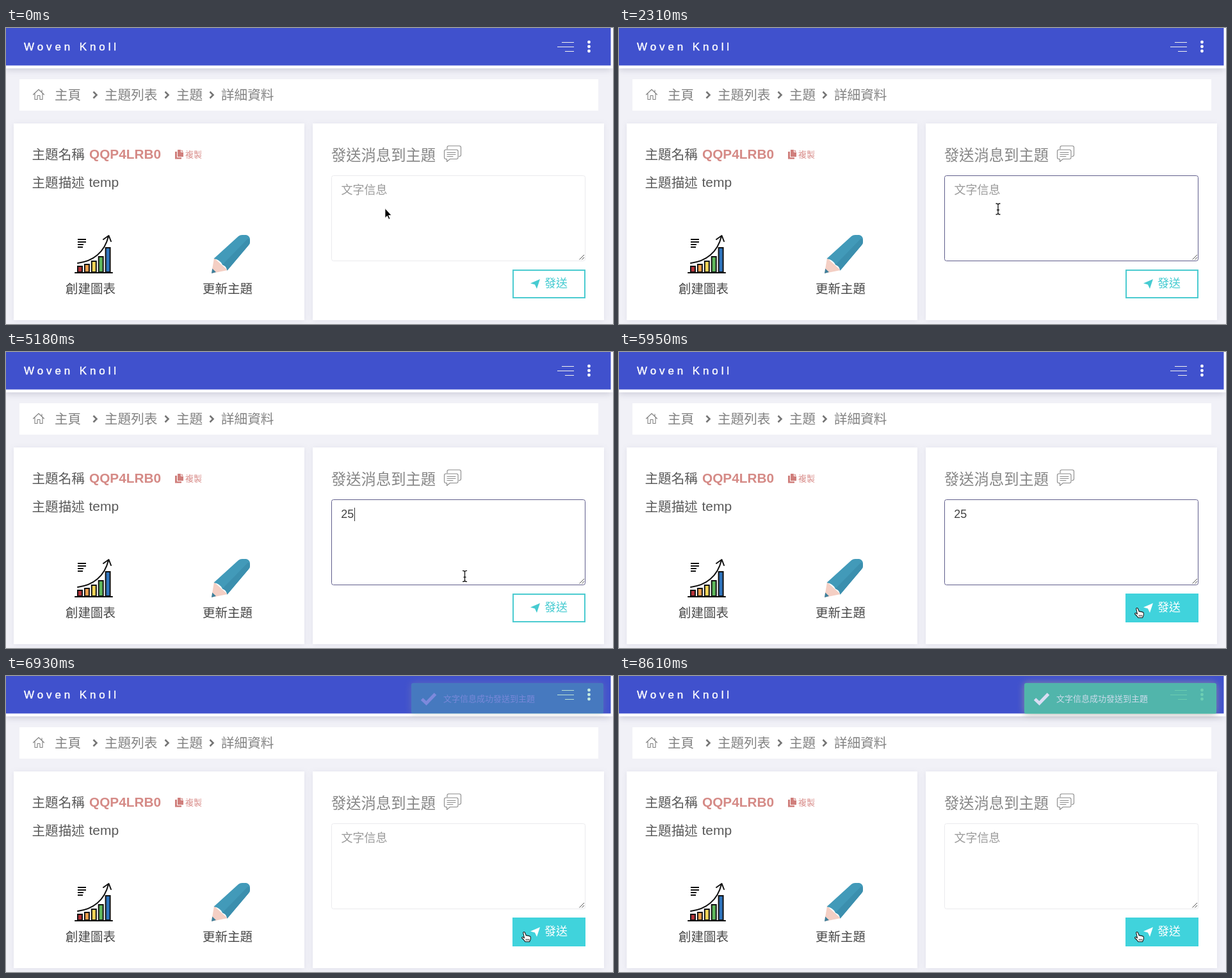
An HTML page that plays this animation: 948 by 462 pixels, repeating every 8820 ms.

```html
<!DOCTYPE html>
<html lang="zh-Hant">
<head>
<meta charset="utf-8">
<title>Topic details</title>
<style>
  html, body { margin: 0; width: 100%; height: 100%; overflow: hidden; background: #f1f1f7; }
  svg { display: block; width: 948px; height: 462px; }
  text { font-family: "Liberation Sans", "Noto Sans CJK TC", "Noto Sans CJK SC", "Noto Sans CJK JP", "Noto Sans CJK", sans-serif; }
  .cjk { font-family: "Noto Sans CJK TC", "Noto Sans CJK SC", "Noto Sans CJK JP", "Noto Sans CJK", sans-serif; font-weight: 300; }
  .crumb { font-size: 20.6px; fill: #828282; }
  .info { font-size: 20.6px; fill: #5a5a5a; }
  .label { font-size: 19.5px; fill: #484848; }
  .line { fill: none; stroke-linecap: round; stroke-linejoin: round; }
  .card { filter: drop-shadow(0 1px 4px rgba(80, 80, 130, .1)); }
  .head { filter: drop-shadow(0 3px 5px rgba(70, 70, 110, .2)); }
  .toast { filter: drop-shadow(0 0 6px #999); }
</style>
</head>
<body>
<svg viewBox="0 0 948 462">
  <rect width="948" height="462" fill="#f1f1f7"/>

  <!-- header -->
  <rect class="head" width="945" height="63" fill="#fff"/>
  <rect x="944" width="4" height="63" fill="#fafafd"/>
  <rect width="944.5" height="58.5" fill="#4051cd"/>
  <text x="28" y="34.500" font-size="17" letter-spacing="4.9" fill="#fff" stroke="#fff" stroke-width=".4">Woven Knoll</text>
  <path d="M868 22.500H887M861 29.500H887M873 36.500H887" stroke="#f4f4ee" stroke-width="1"/>
  <g fill="#fff"><circle cx="910.500" cy="22" r="2.400"/><circle cx="910.500" cy="29" r="2.400"/><circle cx="910.500" cy="36" r="2.400"/></g>

  <!-- breadcrumb -->
  <rect x="21" y="80" width="904" height="49" fill="#fff"/>
  <path class="line" d="M42.500 104 51 96 59.500 104M45 102.500V111.500H49V105.500H53V111.500H57V102.500M56 97V100" stroke="#808080" stroke-width="1.100"/>
  <g class="crumb">
    <text class="cjk" x="76" y="111.500">主頁</text>
    <text class="cjk" x="154" y="111.500">主題列表</text>
    <text class="cjk" x="266" y="111.500">主題</text>
    <text class="cjk" x="336" y="111.500">詳細資料</text>
  </g>
  <path d="M136.500 99.500 141.500 104.500 136.500 109.500M248.500 99.500 253.500 104.500 248.500 109.500M318.500 99.500 323.500 104.500 318.500 109.500" fill="none" stroke="#757575" stroke-width="2.600"/>

  <!-- cards -->
  <rect class="card" x="12" y="149" width="454" height="307" fill="#fff"/>
  <rect class="card" x="479" y="149" width="455" height="307" fill="#fff"/>

  <!-- topic info -->
  <text class="cjk info" x="40.500" y="204.500">主題名稱</text>
  <text x="130" y="204" font-size="20.8" font-weight="700" fill="#d58a86">QQP4LRB0</text>
  <path d="M268 190H273V194H277V201H268Z M274 190 277 193H274Z M264 193H267V202H274V204.500H264Z" fill="#d07f7c"/>
  <text class="cjk" x="280" y="202" font-size="13" fill="#d98e8b">複製</text>
  <text class="cjk info" x="40.500" y="248.500">主題描述</text>
  <text class="info" x="129.500" y="248" style="font-size:21px">temp</text>

  <!-- chart icon -->
  <g class="line" stroke="#111" stroke-width="2">
    <path d="M108 382H166" stroke-width="2.200"/>
    <g id="bars" stroke-linejoin="miter"></g>
    <path d="M112 367C136 364 154 350 160 325M152 330 160.500 324 164 333"/>
    <path d="M112 330H125M112 334H125M112 338H121M112 342H120" stroke-linecap="butt"/>
  </g>
  <text class="cjk label" x="93" y="414">創建圖表</text>

  <!-- pencil icon -->
  <path d="M321 383 325 359 346 378Z" fill="#f4cfc4"/>
  <path d="M321 383 322.200 375.500 328 381Z" fill="#3d7f9b"/>
  <path d="M324.500 360 363 325Q366 322.500 370 323H375Q380 324 381 329V334Q381 337 378.500 339.500L345.500 378.500Q344 371 338 369.500Q335 362 324.500 360Z" fill="#429ab9"/>
  <path d="M338 369.500 378 328.500 381 331V334Q381 337 378.500 339.500L345.500 378.500Q344 371 338 369.500Z" fill="#3b8fae"/>
  <text class="cjk label" x="307" y="414">更新主題</text>

  <!-- message form -->
  <text class="cjk" x="508" y="206.500" font-size="23.3" fill="#868686">發送消息到主題</text>
  <g class="line" stroke="#8a8a8a" stroke-width="1.100">
    <path d="M689 189V186.500Q689 184 691.500 184H708Q710.500 184 710.500 186.500V198Q710.500 200.500 707.500 200.500"/>
    <path d="M687 190H703.500Q706 190 706 192.500V202Q706 204.500 703.500 204.500H693.500L688.500 208.500V204.500H687Q684.500 204.500 684.500 202V192.500Q684.500 190 687 190Z"/>
    <path d="M689 194.500H702M689 197.500H702M689 200.500H698"/>
  </g>
  <rect id="box" x="508.500" y="230.500" width="396" height="133" rx="3" fill="#fff"/>
  <path d="M895.500 361.500 903 354M899.500 361.500 903 358" stroke="#555" stroke-width="1"/>
  <text id="hint" class="cjk" x="523.500" y="259" font-size="18" fill="#9a9a9a">文字信息</text>
  <text id="typed" x="523.300" y="259" font-size="18" fill="#444"></text>
  <rect id="caret" y="243" width="1" height="21" fill="#333"/>

  <!-- send button -->
  <rect id="send" x="792" y="378" width="112" height="43" stroke="#4bcbd0" stroke-width="2" fill="#40d3dc"/>
  <g id="ink">
    <path d="M834 392 829 407 826 400.500 819 398.500Z"/>
    <text class="cjk" x="841" y="405" font-size="18">發送</text>
  </g>

  <!-- toast -->
  <g id="toast">
    <rect class="toast" x="633" y="11" width="300" height="48" rx="3" fill="#54c7a6"/>
    <path d="M649.500 36 656.500 42.500 670.500 28" fill="none" stroke="#f4f6fa" stroke-width="5"/>
    <text class="cjk" x="683" y="40" font-size="13" fill="#e4f3f0">文字信息成功發送到主題</text>
  </g>

  <!-- pointer -->
  <g id="mouse">
    <circle id="ring" r="16.500" fill="#fff" fill-opacity=".5" stroke="#111" stroke-width="1.500"/>
    <path id="arrow" d="M0 -.5V14.500L3.400 11.300 5.800 16.500 7.900 15.600 5.600 10.500H10Z" fill="#000" stroke="#fff" stroke-width=".8"/>
    <path id="beam" class="line" d="M-3 -8Q0 -8 0 -6Q0 -8 3 -8M0 -6V7M-3 9Q0 9 0 7Q0 9 3 9M-1.500 2H1.500" stroke="#111" stroke-width="1.300"/>
    <path id="hand" transform="translate(0 -.5) scale(.95)" d="M-2.500 1Q-1 -1 .5 1L2.500 6Q4 5 5 6.500Q6.500 5.500 7.500 7Q9.500 6.500 9.800 8.500V12L8 16H1Q-1 13 -4.500 10Q-5 8 -2.500 8.500L-.5 10ZM2.500 11.500V14M4.700 11.500V14M6.900 11.500V14" fill="#fff" stroke="#111" stroke-width="1.100" stroke-linejoin="round"/>
  </g>
</svg>
<script>
const LOOP = 8820, STEP = 70;
const $ = id => document.getElementById(id);
const ramp = (t, a, b) => Math.min(1, Math.max(0, (t - a) / (b - a)));
const ease = p => (1 - Math.cos(Math.PI * p)) / 2;
const within = (t, spans) => spans.some(([a, b]) => t >= a && t < b);
const show = (id, on) => { $(id).style.display = on ? "" : "none"; };
const mix = (a, b, p) => `rgb(${a.map((v, i) => Math.round(v + (b[i] - v) * p))})`;

const CARET = [[1190, 1890], [2380, 2870], [3360, 4480], [4970, 5460]];
const CLICKS = [[1190, 1400], [6090, 6300]];
const HIDDEN = [[3710, 4760]];
const TYPED = [[0, ""], [3710, "2"], [3920, "25"], [6720, ""]];
const BARS = [[372, "#b5343a"], [369, "#eda04c"], [364, "#f2d558"], [357, "#5fb85c"], [343, "#2f74bd"]];

$("bars").innerHTML = BARS.map(([y, fill], i) =>
  `<rect x="${112 + i * 10.9}" y="${y}" width="7" height="${381 - y}" fill="${fill}"/>`).join("");

function movePointer(t) {
  const p = ease(ramp(t, 4760, 5530));
  const x = 592 + 218 * p, y = 282 + 118 * p;
  const kind = y > 378 && x > 791 ? "hand" : t < 910 || y > 364 ? "arrow" : "beam";
  $("mouse").setAttribute("transform", `translate(${x} ${y})`);
  show("mouse", !within(t, HIDDEN));
  for (const id of ["arrow", "beam", "hand"]) show(id, id === kind);
  show("ring", within(t, CLICKS));
  $("ring").setAttribute("cy", kind === "hand" ? 6 : 0);
}

function draw(t) {
  movePointer(t);

  const text = TYPED.filter(([at]) => t >= at).pop()[1];
  $("typed").textContent = text;
  show("hint", !text);
  show("caret", within(t, CARET));
  $("caret").setAttribute("x", 524 + text.length * 10);

  const focus = ramp(t, 1290, 1500) - ramp(t, 6130, 6330);
  $("box").style.stroke = mix([234, 234, 237], [96, 94, 140], focus);

  const fill = ramp(t, 700, 900) - ramp(t, 1290, 1500) + ramp(t, 5350, 5550);
  $("send").style.fillOpacity = fill;
  $("send").style.stroke = mix([75, 203, 208], [64, 211, 220], fill);
  $("ink").style.fill = mix([70, 203, 209], [255, 255, 255], fill);

  $("toast").style.opacity = .85 * ease(ramp(t, 6800, 7100));
}

const start = performance.now();
function tick() {
  const t = (performance.now() - start) % LOOP;
  draw(Math.floor(t / STEP) * STEP);
  requestAnimationFrame(tick);
}
tick();
</script>
</body>
</html>
```
